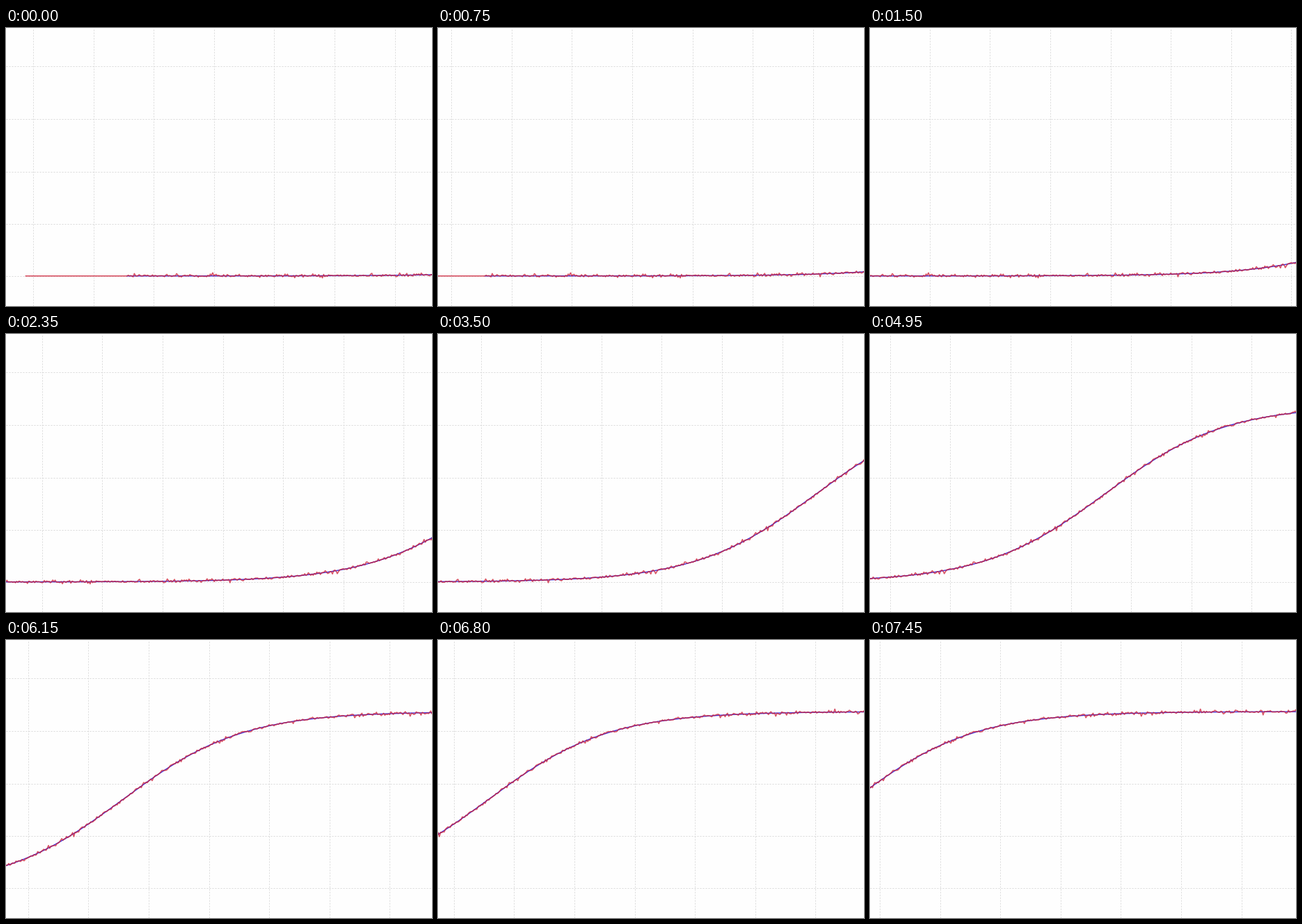
A matplotlib script that plays this animation: 612 px wide and 400 px high, repeating every 7.5 s.

```python
import numpy as np
import matplotlib.pyplot as plt
from matplotlib.animation import FuncAnimation

W, H, DPI = 612, 400, 100
FRAMES, INTERVAL = 150, 50
PX = 72 / DPI

UNIT = 86.6                 # distance between vertical grid lines
GRID_X = 39.0
ROWS = (55, 131, 207, 282, 357)
BASE, TOP = 356.8, 103.0
CENTRE = 1040.5
START, LIVE, END = 28.5, 174, 1720      # flat lead-in, then noisy signal
SPEED, RUSH, RUSH_FROM = 7.1, 0.24, 123


def scroll(i):
    """Steady pan that speeds up slightly near the end."""
    return SPEED * i + RUSH * max(0, i - RUSH_FROM)


def logistic(x):
    return BASE - (BASE - TOP) / (1 + np.exp(-(x - CENTRE) / UNIT))


def noisy_signal():
    rng = np.random.default_rng(7)
    x = np.arange(LIVE, END, UNIT / 50)
    noise = np.clip(0.9 * rng.standard_t(4, x.size), -4.5, 4.5)
    return np.r_[START, x], np.r_[BASE, logistic(x) + noise]


fig = plt.figure(figsize=(W / DPI, H / DPI), dpi=DPI, facecolor="#fefefe")
ax = fig.add_axes([0, 0, 1, 1])
ax.set(xlim=(0, W), ylim=(H, 0))
ax.axis("off")

grid = dict(color="#dadada", lw=PX, ls=(0, (2, 2)), zorder=1)
for y in ROWS:
    ax.axhline(y, **grid)
columns = [ax.axvline(0, **grid) for _ in range(9)]

model_x = np.arange(LIVE, END, 2.0)
model_y = logistic(model_x)
data_x, data_y = noisy_signal()
model, = ax.plot([], [], color="#3a2ad8", lw=1.4 * PX, zorder=2)
data, = ax.plot([], [], color="#cc1c34", lw=1.7 * PX, alpha=0.74, zorder=3)


def update(i):
    shift = scroll(i)
    first = (GRID_X - shift) % UNIT - UNIT
    for k, line in enumerate(columns):
        x = first + k * UNIT
        line.set_xdata([x, x])
    model.set_data(model_x - shift, model_y)
    data.set_data(data_x - shift, data_y)
    return [*columns, model, data]


anim = FuncAnimation(fig, update, frames=FRAMES, interval=INTERVAL,
                     repeat=True, repeat_delay=0, blit=False)
plt.show()
```
